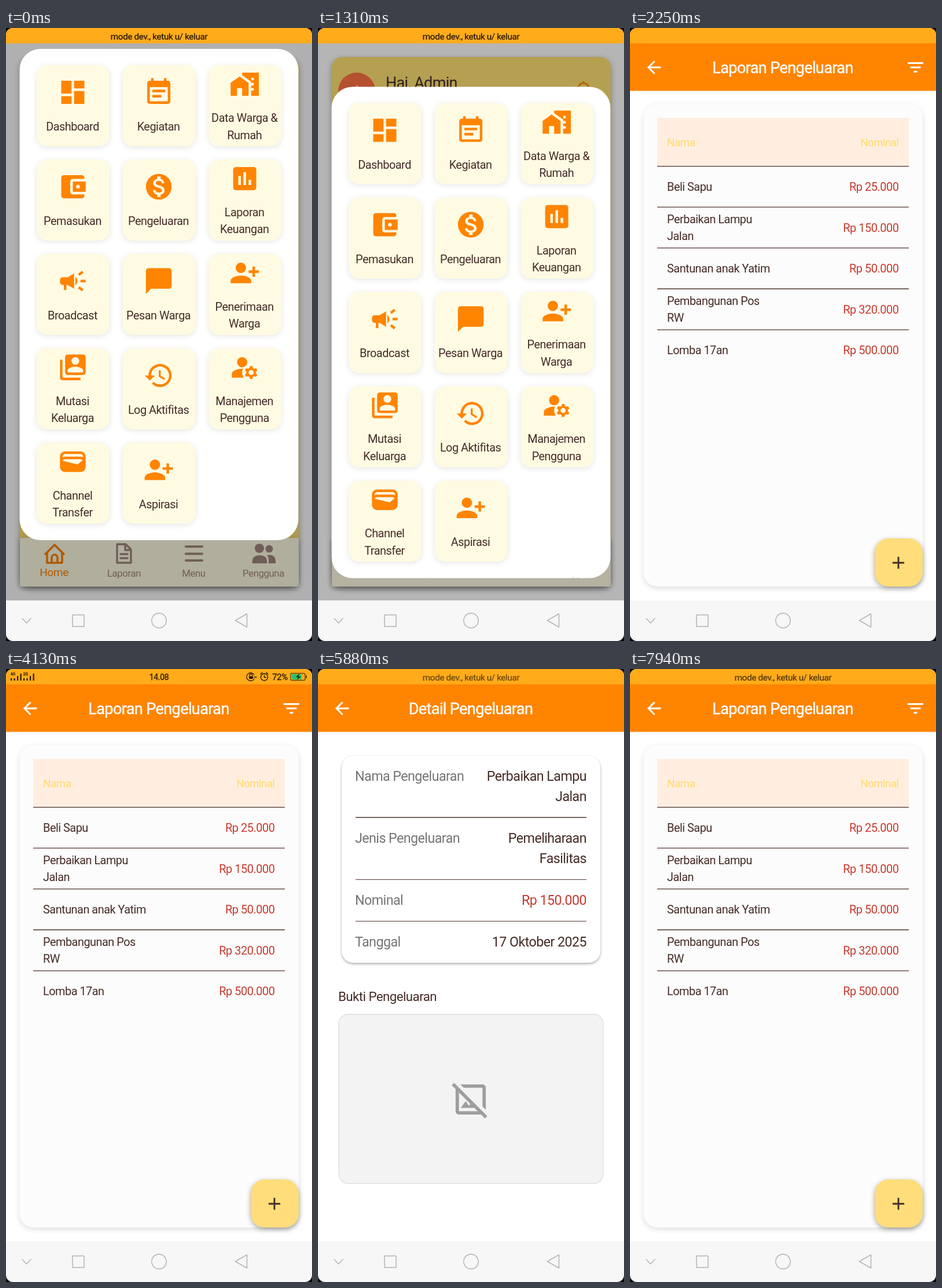
An HTML page that plays this animation: 529x1058 px, repeating every 8 s.

```html
<!DOCTYPE html>
<html lang="id">
<head>
<meta charset="utf-8">
<style>
  html, body { margin: 0; width: 100%; height: 100%; overflow: hidden; background: #000; }
  svg { display: block; width: 529px; height: 1058px; font-family: Roboto, sans-serif; }
  text { letter-spacing: -.025em; }
  .tile { fill: #fffbe3; filter: drop-shadow(0 2px 5px #0000001a); }
  .card { filter: drop-shadow(0 3px 5px #0002); }
  .raised { filter: drop-shadow(0 3px 4px #0005); }
  .line { fill: none; stroke-linecap: round; stroke-linejoin: round; }
</style>
</head>
<body>
<script>
const BROWN = '#452c26', RED = '#c63a2f', ORANGE = '#ff8400', GREY = '#757575', MUTED = '#a1887f';
const YELLOW = '#ffdd7a', INK = '#2a1c00';

const ICONS = {
  dashboard: 'M3 13h8V3H3v10zm0 8h8v-6H3v6zm10 0h8V11h-8v10zm0-18v6h8V3h-8z',
  event: 'M17 10H7v2h10v-2zm2-7h-1V1h-2v2H8V1H6v2H5c-1.11 0-1.99.9-1.99 2L3 19c0 1.1.89 2 2 2h14c1.1 0 2-.9 2-2V5c0-1.1-.9-2-2-2zm0 16H5V8h14v11zm-5-5H7v2h7v-2z',
  houses: 'M1 11v10h5v-6h4v6h5V11L8 6zM10 3v1.97l7 5V11h2v2h-2v2h2v2h-2v4h6V3H10zm9 6h-2V7h2v2z',
  purse: 'M21 18v1c0 1.1-.9 2-2 2H5c-1.11 0-2-.9-2-2V5c0-1.1.89-2 2-2h14c1.1 0 2 .9 2 2v1h-9c-1.11 0-2 .9-2 2v8c0 1.1.89 2 2 2h9zm-9-2h10V8H12v8zm4-2.5c-.83 0-1.5-.67-1.5-1.5s.67-1.5 1.5-1.5 1.5.67 1.5 1.5-.67 1.5-1.5 1.5z',
  coin: 'M12 2C6.48 2 2 6.48 2 12s4.48 10 10 10 10-4.48 10-10S17.52 2 12 2zm1.41 16.09V20h-2.67v-1.93c-1.71-.36-3.16-1.46-3.27-3.4h1.96c.1 1.05.82 1.87 2.65 1.87 1.96 0 2.4-.98 2.4-1.59 0-.83-.44-1.61-2.67-2.14-2.48-.6-4.18-1.62-4.18-3.67 0-1.72 1.39-2.84 3.11-3.21V4h2.67v1.95c1.86.45 2.79 1.86 2.85 3.39H14.3c-.05-1.11-.64-1.87-2.22-1.87-1.5 0-2.4.68-2.4 1.64 0 .84.65 1.39 2.67 1.91s4.18 1.39 4.18 3.91c-.01 1.83-1.38 2.83-3.12 3.16z',
  chart: 'M19 3H5c-1.1 0-2 .9-2 2v14c0 1.1.9 2 2 2h14c1.1 0 2-.9 2-2V5c0-1.1-.9-2-2-2zM9 17H7v-7h2v7zm4 0h-2V7h2v10zm4 0h-2v-4h2v4z',
  horn: 'M18 11v2h4v-2h-4zm-2 6.61l3.2 2.39 1.2-1.6-3.2-2.4zM20.4 5.6L19.2 4 16 6.4 17.2 8zM4 9c-1.1 0-2 .9-2 2v2c0 1.1.9 2 2 2h1v4h2v-4h1l5 3V6L8 9H4zm11.5 3c0-1.33-.58-2.53-1.5-3.35v6.69c.92-.81 1.5-2.01 1.5-3.34z',
  chat: 'M20 2H4c-1.1 0-2 .9-2 2v18l4-4h14c1.1 0 2-.9 2-2V4c0-1.1-.9-2-2-2z',
  addUser: 'M13 8c0-2.21-1.79-4-4-4S5 5.79 5 8s1.79 4 4 4 4-1.79 4-4zm2 2v2h3v3h2v-3h3v-2h-3V7h-2v3h-3zM1 18v2h16v-2c0-2.66-5.33-4-8-4s-8 1.34-8 4z',
  album: 'M4 6H2v14c0 1.1.9 2 2 2h14v-2H4V6zm16-4H8c-1.1 0-2 .9-2 2v12c0 1.1.9 2 2 2h12c1.1 0 2-.9 2-2V4c0-1.1-.9-2-2-2zm-6 2c1.66 0 3 1.34 3 3s-1.34 3-3 3-3-1.34-3-3 1.34-3 3-3zm6 12H8v-1.5c0-1.99 4-3 6-3s6 1.01 6 3V16z',
  history: 'M13 3c-4.97 0-9 4.03-9 9H1l3.89 3.89.07.14L9 12H6c0-3.87 3.13-7 7-7s7 3.13 7 7-3.13 7-7 7c-1.93 0-3.68-.79-4.94-2.06l-1.42 1.42C8.27 19.99 10.51 21 13 21c4.97 0 9-4.03 9-9s-4.03-9-9-9zm-1 5v5l4.28 2.54.72-1.21-3.5-2.08V8H12z',
  manage: 'M14 8a4 4 0 1 0-8 0 4 4 0 1 0 8 0zM10.67 13.02c-.22-.01-.44-.02-.67-.02-2.42 0-4.68.67-6.61 1.82C2.51 15.34 2 16.32 2 17.35V20h9.26c-.79-1.13-1.26-2.51-1.26-4 0-1.07.25-2.07.67-2.98zM20.75 16c0-.22-.03-.42-.06-.63l1.14-1.01-1-1.73-1.45.49c-.32-.27-.68-.48-1.08-.63L18 11h-2l-.3 1.49c-.4.15-.76.36-1.08.63l-1.45-.49-1 1.73 1.14 1.01c-.03.21-.06.41-.06.63s.03.42.06.63l-1.14 1.01 1 1.73 1.45-.49c.32.27.68.48 1.08.63L16 21h2l.3-1.49c.4-.15.76-.36 1.08-.63l1.45.49 1-1.73-1.14-1.01c.03-.21.06-.41.06-.63zM17 18c-1.1 0-2-.9-2-2s.9-2 2-2 2 .9 2 2-.9 2-2 2z',
  wallet: 'M18 4H6C3.79 4 2 5.79 2 8v8c0 2.21 1.79 4 4 4h12c2.21 0 4-1.79 4-4V8c0-2.21-1.79-4-4-4zm-1.86 9.77c-.24.2-.57.28-.88.2L4.15 11.25C4.45 10.52 5.16 10 6 10h12c.67 0 1.26.34 1.63.84l-3.49 2.93zM6 6h12c1.1 0 2 .9 2 2v.55c-.59-.34-1.27-.55-2-.55H6c-.73 0-1.41.21-2 .55V8c0-1.1.9-2 2-2z',
  back: 'M20 11H7.83l5.59-5.59L12 4l-8 8 8 8 1.41-1.41L7.83 13H20v-2z',
  filter: 'M10 18h4v-2h-4v2zM3 6v2h18V6H3zm3 7h12v-2H6v2z',
  add: 'M19 13h-6v6h-2v-6H5v-2h6V5h2v6h6v2z',
  noImage: 'M21.9 21.9L2.1 2.1.69 3.51 3 5.83V19c0 1.1.9 2 2 2h13.17l2.31 2.31zM5 19V7.83l6.84 6.84-.84 1.05L9 13l-3 4h8.17l2 2zM7.83 5l-2-2H19c1.1 0 2 .9 2 2v13.17l-2-2V5z'
};

const icon = (name, x, y, scale, fill) =>
  `<path d="${ICONS[name]}" fill="${fill}" fill-rule="evenodd" transform="translate(${x} ${y}) scale(${scale}) translate(-12 -12)"/>`;
const rect = (x, y, x2, y2, r, fill, extra = '') =>
  `<rect x="${x}" y="${y}" width="${x2 - x}" height="${y2 - y}" rx="${r}" fill="${fill}" ${extra}/>`;
// y is the middle of the capital letters
const text = (s, x, y, size, fill, anchor = 'middle', weight = 0) =>
  `<text x="${x}" y="${y + size * .355}" font-size="${size}" fill="${fill}" text-anchor="${anchor}" stroke="${fill}" stroke-width="${weight}">${s}</text>`;
const rule = (x, x2, y, width = 1.3) =>
  `<path d="M${x} ${y}H${x2}" stroke="#4e342e" stroke-width="${width}"/>`;
const stroke = (d, color, width) => `<path class="line" d="${d}" stroke="${color}" stroke-width="${width}"/>`;
const group = (id, content) => `<g id="${id}">${content}</g>`;

const MENU = [
  ['dashboard', 'Dashboard'], ['event', 'Kegiatan'], ['houses', 'Data Warga &amp;', 'Rumah'],
  ['purse', 'Pemasukan'], ['coin', 'Pengeluaran'], ['chart', 'Laporan', 'Keuangan'],
  ['horn', 'Broadcast'], ['chat', 'Pesan Warga'], ['addUser', 'Penerimaan', 'Warga'],
  ['album', 'Mutasi', 'Keluarga'], ['history', 'Log Aktifitas'], ['manage', 'Manajemen', 'Pengguna'],
  ['wallet', 'Channel', 'Transfer'], ['addUser', 'Aspirasi']
];

function menuTile([name, first, second], i) {
  const x = 53 + i % 3 * 148.6, y = 64 + Math.floor(i / 3) * 162.9, mid = x + 62.5;
  return rect(x, y, x + 126, y + 140, 18, '#fffbe3', 'class="tile"') +
    icon(name, mid, y + (second ? 33 : 47), 2.22, ORANGE) +
    text(first, mid - .5, y + (second ? 91 : 106), 19.9, BROWN) +
    (second ? text(second, mid - .5, y + 120.5, 19.9, BROWN) : '');
}

const home = rect(0, 0, 529, 988, 0, '#fff') +
  rect(24, 50, 506, 964, 18, '#ffdf72', 'style="filter:drop-shadow(0 4px 6px #0005)"') +
  '<circle cx="67" cy="109" r="32" fill="#ff7043"/>' +
  text('A', 67, 110, 32, '#ffd9a8') +
  text('Hai, Admin', 117, 94, 27, BROWN, 'start') +
  stroke('M447 116h24l-3-4v-8a9 9 0 0 0-18 0v8zM459 95v-2M456 120h6', ORANGE, 2.6) +
  rect(24, 880, 506, 964, 3, '#fffbe3', 'class="raised"') +
  stroke('M68 908l16-16 16 16M71 906v17h26v-17M79 923v-9a5 5 0 0 1 10 0v9', ORANGE, 3.6) +
  stroke('M195 891h12l9 9v23h-24v-32zM206 891v10h10M198 908h12M198 915h12', MUTED, 3.4) +
  stroke('M311 895h28M311 907.5h28M311 919h28', MUTED, 4) +
  `<g fill="${MUTED}"><circle cx="438" cy="898" r="8"/><circle cx="455" cy="899" r="6.5"/>
   <path d="M426 924v-5c0-12 25-12 25 0v5zM454 924v-6q0-5-3-8c7-2 15 1 15 9v5z"/></g>` +
  text('Home', 83, 939, 19.2, ORANGE) + text('Laporan', 204, 941, 16.8, MUTED) +
  text('Menu', 324.5, 941, 16.8, MUTED) + text('Pengguna', 445, 941, 16.8, MUTED);

const sheet = rect(23.5, 36, 505.5, 884, 36, '#fff') + MENU.map(menuTile).join('');

const appBar = title => rect(0, 0, 529, 988, 0, '#fff') + rect(0, 0, 529, 108.5, 0, ORANGE) +
  icon('back', 41.5, 68, 1.47, '#fff') + text(title, 264, 68.5, 27.2, '#fff', 'middle', .4);

const EXPENSES = [
  ['25.000', 'Beli Sapu'], ['150.000', 'Perbaikan Lampu', 'Jalan'], ['50.000', 'Santunan anak Yatim'],
  ['320.000', 'Pembangunan Pos', 'RW'], ['500.000', 'Lomba 17an']
];
const list = appBar('Laporan Pengeluaran') + icon('filter', 493.5, 68, 1.5, '#fff') +
  rect(23.5, 131, 506, 964, 24, '#fcfcfc', 'class="card"') +
  rect(47, 155, 482, 238, 0, '#ffeee0') +
  text('Nama', 64, 197.5, 18.9, YELLOW, 'start', .3) +
  text('Nominal', 464.5, 197.5, 18.5, YELLOW, 'end', .3) +
  EXPENSES.map(([amount, first, second], i) => {
    const y = 274 + i * 70.55;
    return rule(47, 482, y - 35.4) + text('Rp ' + amount, 464.5, y, 20, RED, 'end') +
      text(first, 64, second ? y - 15 : y, 19.9, BROWN, 'start') +
      (second ? text(second, 64, y + 14.5, 19.9, BROWN, 'start') : '');
  }).join('') +
  rect(423, 881, 506, 964, 24, YELLOW, 'class="raised"') + icon('add', 464, 923, 1.45, BROWN);

const label = (s, y) => text(s, 64, y, 23.3, GREY, 'start');
const value = (s, y, color = BROWN) => text(s, 464, y, 23.3, color, 'end');
const detail = appBar('Detail Pengeluaran') +
  rect(41, 150, 488, 507, 20, '#fff', 'style="filter:drop-shadow(0 2px 2px #0005)"') +
  label('Nama Pengeluaran', 185) + value('Perbaikan Lampu', 185) + value('Jalan', 220) +
  label('Jenis Pengeluaran', 292) + value('Pemeliharaan', 292) + value('Fasilitas', 327) +
  label('Nominal', 399) + value('Rp 150.000', 399, RED) +
  label('Tanggal', 471) + value('17 Oktober 2025', 471) +
  rule(65, 464, 256.3, 1.5) + rule(65, 464, 363.4, 1) + rule(65, 464, 435.3, 1) +
  text('Bukti Pengeluaran', 35, 565, 22.3, BROWN, 'start') +
  rect(36, 596, 493, 888, 16, '#f3f3f3', 'stroke="#dedede" stroke-width="1.3"') +
  icon('noImage', 264, 743, 2.9, '#9e9e9e');

const signal = (x, name) => text(name, x + 5, 9, 7, INK, 'middle', .3) +
  [4, 4, 8, 12].map((h, i) => rect(x + 1 + i * 5.5, 20 - h, x + 3.2 + i * 5.5, 20, 0, INK)).join('');
const clock = signal(7, '4G') + signal(29, '2G') +
  text('14.08', 264.5, 14, 14, INK, 'middle', .3) +
  stroke('M429 17a7 7 0 1 1 0-7M421 13v-2a2.5 2.5 0 0 1 5 0v2M429 14h4', INK, 1.3) +
  rect(420, 12.5, 427, 17, 1, INK) +
  stroke('M446.5 8a6 6 0 1 0 .1 0M446.5 11v3.5h3M440 9l3-3M453 9l-3-3', INK, 1.3) +
  text('72%', 473.5, 13.5, 14.8, INK, 'middle', .3) +
  rect(492, 7.5, 517, 19.5, 2, 'none', 'stroke="#5a4410" stroke-width="1.3"') +
  rect(494, 9, 511, 18, 1, '#2bc46a') + rect(518, 11, 520, 16, 0, '#5a4410') +
  '<path d="M507 8l-6 6h4l-2 5 7-6h-4z" fill="#1d2a10"/>';

const systemBar = rect(0, 988, 529, 1058, 0, '#f7f7f7') +
  stroke('M28 1019l7.5 8 7.5-8M115 1013h20v20h-20zM264.5 1010a12.7 12.7 0 1 0 .1 0M416.5 1011v23l-20-11.5z', '#b4b4b4', 1.5);

document.body.innerHTML = `<svg viewBox="0 0 529 1058">
  <clipPath id="screen"><rect width="529" height="1058" rx="12"/></clipPath>
  <clipPath id="app"><rect width="529" height="988"/></clipPath>
  <g clip-path="url(#screen)">
    <g clip-path="url(#app)">
      ${rect(0, 0, 529, 988, 0, '#fff')}
      ${group('home', home)}
      ${group('dim', rect(0, 0, 529, 988, 0, '#000'))}
      ${group('sheet', sheet)}
      ${group('list', list)}
      ${group('detail', detail)}
    </g>
    ${rect(0, 0, 529, 26.5, 0, '#ffab1a')}
    ${group('mode', text('mode dev., ketuk u/ keluar', 264.5, 14.5, 15.3, '#1f1300', 'middle', .2))}
    ${group('clock', clock)}
    ${systemBar}
  </g>
</svg>`;

const node = Object.fromEntries(['dim', 'sheet', 'list', 'detail', 'mode', 'clock']
  .map(id => [id, document.getElementById(id)]));
const ramp = (t, start, length) => Math.min(1, Math.max(0, (t - start) / length));
const easeOut = p => 1 - (1 - p) ** 3;

function setOpacity(el, value) {
  el.setAttribute('opacity', value);
  el.style.display = value > 0 ? '' : 'none';
}
function zoom(el, scale) {
  el.setAttribute('transform', `translate(264.5 507) scale(${scale}) translate(-264.5 -507)`);
}

function render(t) {
  const close = ramp(t, 1260, 200) ** 2;
  setOpacity(node.dim, .31 * (1 - close));
  node.sheet.setAttribute('transform', `translate(0 ${close * 952})`);

  const openList = ramp(t, 1320, 300);
  setOpacity(node.list, ramp(openList, .1, .3));
  const openDetail = ramp(t, 5120, 300), leave = ramp(t, 7560, 300);
  setOpacity(node.detail, ramp(openDetail, .1, .3) * (1 - ramp(leave, .1, .3)));
  zoom(node.detail, .88 + .12 * easeOut(openDetail) - .1 * easeOut(leave));
  const behind = easeOut(openDetail) - easeOut(leave);
  zoom(node.list, .88 + .12 * easeOut(openList) + .05 * behind);

  setOpacity(node.mode, 1 - ramp(t, 2020, 180) + ramp(t, 5760, 170) - ramp(t, 7900, 180));
  setOpacity(node.clock, ramp(t, 2280, 180) - ramp(t, 5480, 180));
}

const STEP = 1000 / 16;
function tick() {
  const t = performance.now() % 8000;
  render(Math.floor((t + 4) / STEP) * STEP);
  requestAnimationFrame(tick);
}
tick();
</script>
</body>
</html>
```
